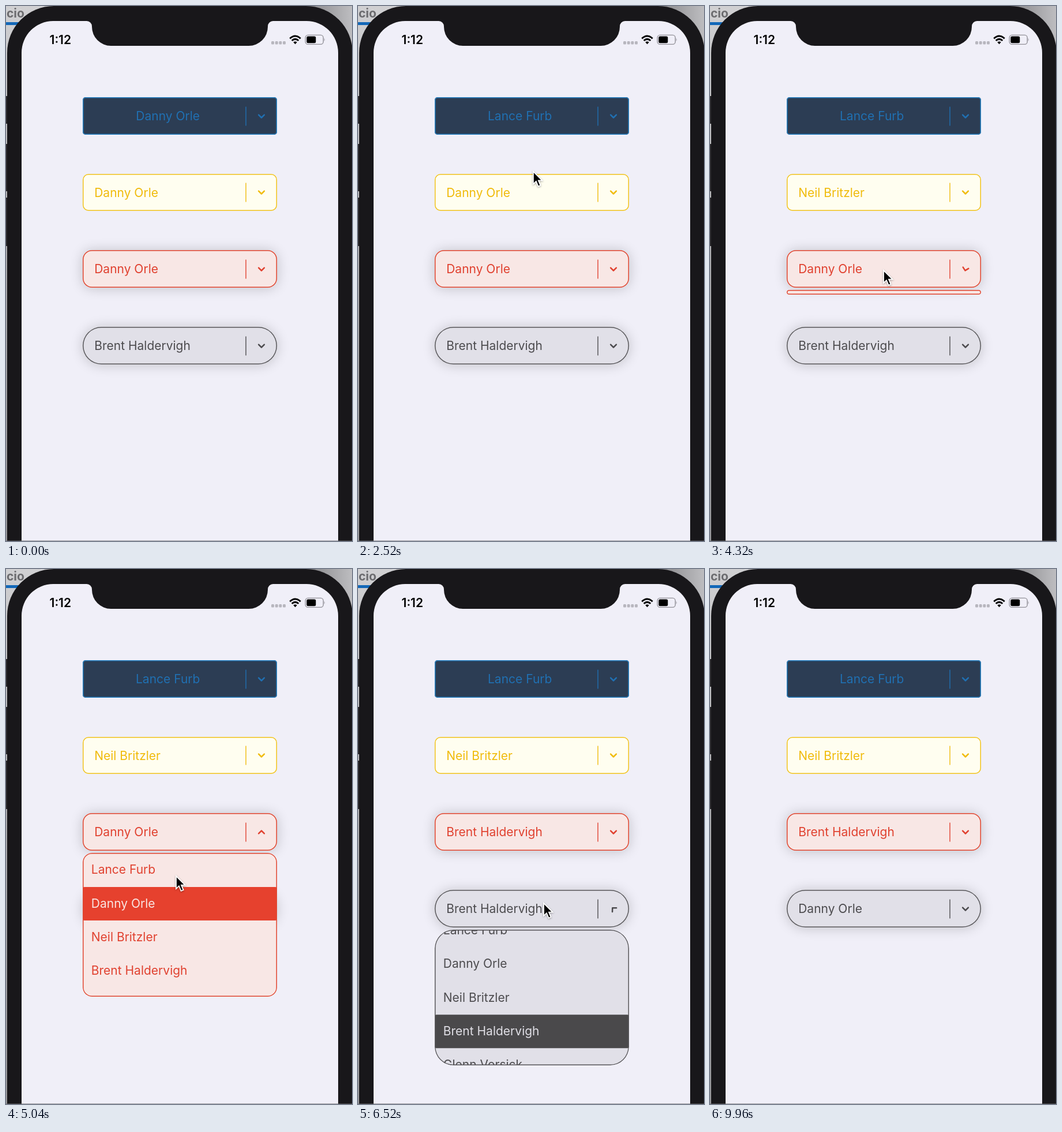
An HTML page for the animation above (10000 ms loop, 600 by 927 pixels).

```html
<!DOCTYPE html>
<html lang="en">
<head>
<meta charset="utf-8">
<title>Dropdown styles</title>
<style>
  html, body { margin: 0; width: 100%; height: 100%; overflow: hidden; background: #18171a; }
  #stage { position: absolute; left: 0; top: 0; width: 600px; height: 927px; overflow: hidden; font: 21px Inter, sans-serif; }
  svg { position: absolute; left: 0; top: 0; overflow: visible; }
  .field, .list { position: absolute; left: 133.2px; width: 336.5px;
    border-radius: var(--r); background: var(--bg); color: var(--ink); }
  .field::after, .list::after { content: ""; position: absolute; inset: 0; border-radius: inherit;
    box-shadow: inset 0 0 0 1.5px var(--line); }
  .field { height: 64.6px; }
  .glow { box-shadow: 0 1px 22px rgba(0, 0, 0, .2); }
  .label { position: absolute; left: 20px; width: 255px; top: 0; line-height: 65px; white-space: pre; text-align: var(--align); }
  .tools { left: 303.3px; top: 25.5px; width: 14px; height: 14px; fill: none; stroke: var(--ink); }
  .arrow { stroke-width: 2.5; stroke-linecap: round; stroke-linejoin: round; }
  .list { overflow: hidden; z-index: 2; }
  .row { height: 58.3px; line-height: 58.3px; padding: var(--pad); border-radius: 3px; white-space: pre; text-align: var(--align); }
  .row.on { background: var(--fill); color: var(--pick); }
  #cursor { z-index: 3; filter: drop-shadow(0 1.5px 1.5px rgba(0, 0, 0, .35)); }
</style>
</head>
<body>
<div id="stage">
  <svg width="600" height="927" viewBox="0 0 600 927">
    <defs>
      <linearGradient id="side" x1="0" y1="0" x2="0" y2="1">
        <stop offset="0" stop-color="#d0d0d2"/>
        <stop offset=".5" stop-color="#aaaaad"/>
        <stop offset="1" stop-color="#98989b"/>
      </linearGradient>
      <linearGradient id="corner" x1="0" y1="0" x2="1" y2="0">
        <stop offset="0" stop-color="#77777a"/>
        <stop offset="1" stop-color="#bdbdc0"/>
      </linearGradient>
    </defs>
    <rect width="600" height="927" fill="url(#side)"/>
    <rect x="500" width="100" height="90" fill="url(#corner)"/>
    <text x="1" y="20" font-size="21" font-weight="700" fill="#6c6c6f">cio</text>
    <rect y="28" width="40" height="5" fill="#1368b8"/>
    <path d="M0 156h4v48H0zM0 239h4v82H0zM0 332h4v84H0z" fill="#29282b"/>
    <path d="M2 927V81A81 81 0 0 1 83 0H520A81 81 0 0 1 601 81V927Z" fill="#18171a"/>
    <path d="M27 927V81A55 55 0 0 1 82 26H140A9 9 0 0 1 149 35V36A33 33 0 0 0 182 69H421
      A33 33 0 0 0 454 36V35A9 9 0 0 1 463 26H521A55 55 0 0 1 576 81V927Z" fill="#f0eff8"/>
    <rect y="926" width="600" height="1" fill="#66666a" opacity=".6"/>
    <text x="75.5" y="65.7" font-size="21" font-weight="600" fill="#000">1:12</text>
    <g fill="#b7b6be">
      <rect x="460" y="61" width="5" height="5.5" rx="1.5"/>
      <rect x="466.7" y="61" width="5" height="5.5" rx="1.5"/>
      <rect x="473.3" y="61" width="5" height="5.5" rx="1.5"/>
      <rect x="480" y="61" width="5" height="5.5" rx="1.5"/>
    </g>
    <g fill="none" stroke="#000" stroke-width="3">
      <path d="M492.3 56.3Q501.5 47.8 510.7 56.3"/>
      <path d="M495.7 60Q501.5 54.8 507.3 60"/>
    </g>
    <path d="M498.3 62.8Q501.5 60.2 504.7 62.8L501.5 66.2Z"/>
    <rect x="519.2" y="50.4" width="31" height="16" rx="4.5" fill="none" stroke="#929198" stroke-width="1.4"/>
    <rect x="521.3" y="52.5" width="16" height="11.8" rx="2.5"/>
    <path d="M551.6 55.6Q553.6 58.4 551.6 61.2Z" fill="#929198"/>
  </svg>
  <svg id="cursor" width="20" height="30" viewBox="0 0 20 30">
    <path d="M1 2V24L6 19.2 9.6 27.8 13.6 26.1 10 17.7H16.6Z" fill="#000" stroke="#fff" stroke-width="1.8"/>
  </svg>
</div>
<script>
const LOOP = 10000, FULL = 248.8, PITCH = 132.7, GAP = 69;
const names = ['Lance Furb', 'Danny Orle', 'Neil Britzler', 'Brent Haldervigh', 'Glenn Vorsick'];
const stage = document.getElementById('stage');
const cursor = document.getElementById('cursor');

// open / close: times in ms; from / to: selected row before and after
const menus = [
  { open: 1226, close: 2150, from: 1, to: 0, ink: '#2070b2', line: '#2580c2', fill: '#2070b4', bg: '#2c3d54', pick: '#f4f6fa', r: 5, align: 'center' },
  { open: 2957, close: 3625, from: 1, to: 2, ink: '#f0bb0c', line: '#f0c21c', fill: '#f2bc02', bg: '#fffef0', pick: '#fffdf0', r: 10 },
  { open: 4300, close: 5600, from: 1, to: 3, ink: '#e0412f', line: '#e0452f', fill: '#e6412e', bg: '#f8e7e5', pick: '#f8e5e2', r: 16, glow: true },
  { open: 6270, close: 7140, from: 3, to: 1, ink: '#4c4b4e', line: '#58575a', fill: '#4a494b', bg: '#e1e0e8', pick: '#e0dfe6', r: 32.3, glow: true, scroll: 44 }
];

// time, x, y of the pointer tip
const path = [
  [700, 560, 842], [1150, 327, 186], [1560, 327, 186], [2000, 305, 255], [2250, 305, 255],
  [2850, 300, 325], [3100, 300, 325], [3480, 285, 502], [3750, 285, 502], [4200, 300, 456],
  [4700, 300, 456], [5040, 294, 530], [5400, 300, 695], [5650, 300, 695], [6150, 321, 577],
  [6600, 321, 577], [7020, 283, 648], [7900, 283, 648]
];

const clamp = x => Math.min(1, Math.max(0, x));
const smooth = x => (1 - Math.cos(Math.PI * clamp(x))) / 2;
const easeOut = x => Math.sin(Math.PI / 2 * clamp(x));

// damped spring from 0 to 1 with a 2% overshoot
function spring(ms) {
  const a = ms * 0.008, k = 1.245;
  return ms <= 0 ? 0 : 1 - Math.exp(-k * a) * (Math.cos(a) + k * Math.sin(a));
}

function add(parent, cls, html = '') {
  const el = document.createElement('div');
  el.className = cls;
  el.innerHTML = html;
  parent.append(el);
  return el;
}

menus.forEach((m, i) => {
  const top = 158 + PITCH * i;
  const field = add(stage, 'field' + (m.glow ? ' glow' : ''),
    '<div class="label"></div><svg class="tools" viewBox="-7 -7 14 14">' +
    '<path d="M-27-16.5V16.5" stroke-width="1.4"/><path class="arrow" d="M-4.9-2.3 0 2.5 4.9-2.3"/></svg>');
  const list = add(stage, 'list');
  m.list = list;
  m.inner = add(list, 'inner', names.map(n => `<div class="row">${n}</div>`).join(''));
  m.rows = [...m.inner.children];
  m.label = field.querySelector('.label');
  m.arrow = field.querySelector('.arrow');
  field.style.top = top + 'px';
  list.style.top = top + GAP + 'px';
  const vars = {
    ink: m.ink, line: m.line, fill: m.fill, bg: m.bg, pick: m.pick, r: m.r + 'px',
    align: m.align || 'left', pad: m.align ? '0 14px 0 0' : '0 0 0 14.6px'
  };
  for (const el of [field, list])
    for (const key in vars) el.style.setProperty('--' + key, vars[key]);
});

function drawMenu(m, t) {
  const shut = smooth((t - m.close) / 300);
  const size = spring(t - m.open) * (1 - shut) * FULL;
  const turn = easeOut((t - m.open) / 460) * (1 - shut) * 180;
  const row = t < m.close ? m.from : m.to;
  const shift = (m.scroll || 0) * smooth((t - m.open) / 430);
  m.list.style.display = size > 1 ? 'block' : 'none';
  m.list.style.height = size + 'px';
  m.inner.style.transform = `translateY(${-shift}px)`;
  m.arrow.setAttribute('transform', `rotate(${turn})`);
  if (m.row !== row) {
    m.row = row;
    m.label.textContent = names[row];
    m.rows.forEach((el, i) => el.classList.toggle('on', i === row));
  }
}

function drawCursor(t) {
  const n = path.findIndex(p => p[0] > t);
  cursor.style.display = n > 0 ? 'block' : 'none';
  if (n < 1) return;
  const [t0, x0, y0] = path[n - 1], [t1, x1, y1] = path[n];
  const p = smooth((t - t0) / (t1 - t0));
  cursor.style.transform = `translate(${x0 + (x1 - x0) * p}px, ${y0 + (y1 - y0) * p}px)`;
}

const start = performance.now();
function frame() {
  const t = (performance.now() - start) % LOOP;
  menus.forEach(m => drawMenu(m, t));
  drawCursor(t);
  requestAnimationFrame(frame);
}
frame();
</script>
</body>
</html>
```
